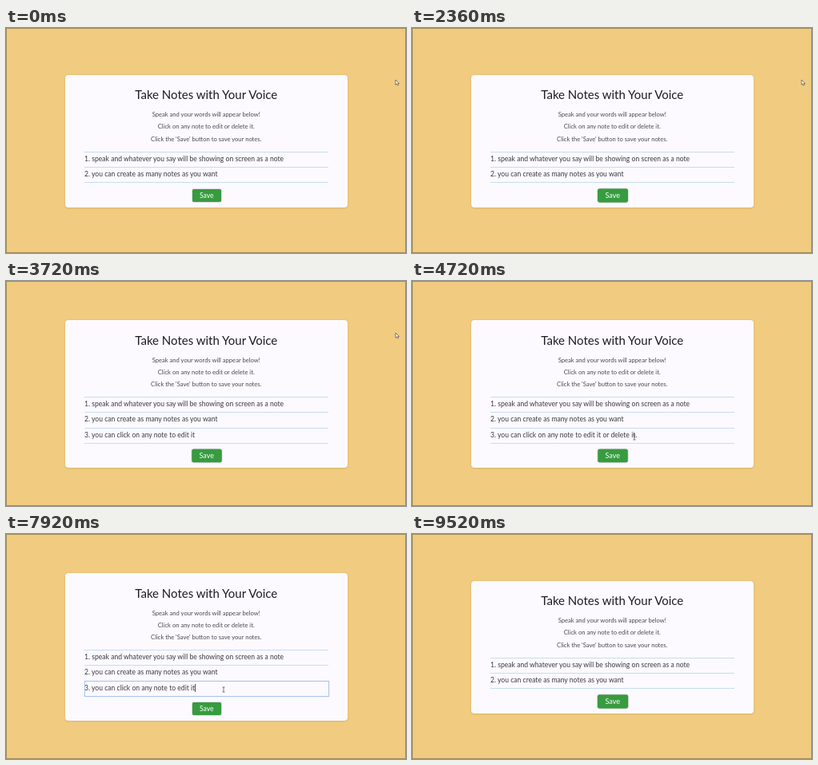
Write an HTML page that moves like this. It is 500 px wide and 282 px high and loops after 9.56 s.

```html
<!DOCTYPE html>
<html lang="en">
<head>
<meta charset="utf-8">
<title>Voice notes</title>
<style>
  html, body { margin: 0; width: 100%; height: 100%; overflow: hidden; }
  body { background: #f0cb80; font-family: Lato, sans-serif; color: #3a383e; }
  .stage { position: relative; width: 500px; height: 282px; overflow: hidden; }
  .edge { position: absolute; inset: 0; border: 1px solid #a38d5d; }

  .card {
    position: absolute; left: 74px; top: 58.5px; width: 352.5px; height: 166px;
    border-radius: 4px; background: #fcfafe;
    box-shadow: 0 .5px 2px rgba(90, 65, 15, .25);
    animation: grow 9.56s step-end infinite;
  }
  h1, p { margin: 0; text-align: center; white-space: nowrap; }
  h1 { padding-top: 14.5px; font-size: 15px; font-weight: 400; line-height: 20px; color: #1d1b21; }
  .hints { position: absolute; top: 42.5px; width: 100%; }
  p { font-size: 7.6px; line-height: 15.4px; color: #4a484e; }

  .notes { position: absolute; left: 24px; top: 96px; width: 305px; border-top: 1px solid #c6dcf3; }
  .note {
    position: relative; box-sizing: border-box; height: 19.3px; border-bottom: 1px solid #c6dcf3;
    font-size: 8.55px; line-height: 17px; word-spacing: .1px; white-space: pre;
  }
  .spoken { animation: present 9.56s step-end infinite; }
  .ring {
    position: absolute; inset: -1px -.5px -1px -.5px; border: 1px solid #a9c5ee;
    box-shadow: 0 0 1px #c3d8f6; opacity: 0;
    animation: focus 9.56s step-end infinite;
  }
  #marked { background: #b4d5fe; }
  #caret { display: inline-block; width: 1px; height: 10px; margin-right: -1px; vertical-align: -2px; background: #555; }

  .save {
    position: absolute; left: 158.5px; bottom: 7px; width: 35.5px; height: 16px;
    border-radius: 2px; background: #379b3f; color: #fff;
    font-size: 8.6px; line-height: 17px; text-align: center;
    box-shadow: 0 0 1.5px rgba(40, 50, 40, .6);
    animation: pulse 1s ease-in-out infinite;
  }

  .pointer { position: absolute; left: 0; top: 0; width: 1px; height: 1px; overflow: visible; animation: travel 9.56s ease-in-out infinite; }
  .arrow { animation: arrow 9.56s step-end infinite; }
  .beam { animation: beam 9.56s step-end infinite; }

  @keyframes grow {
    0%, 95% { top: 58.5px; height: 166px; }
    31%, 94.99% { top: 49px; height: 185px; }
    100% { top: 58.5px; height: 166px; }
  }
  @keyframes present {
    0%, 95%, 100% { visibility: hidden; }
    31% { visibility: visible; }
  }
  @keyframes focus {
    0%, 75.3%, 92%, 100% { opacity: 0; }
    50%, 79.7% { opacity: 1; }
  }
  @keyframes pulse {
    0%, 100% { transform: none; }
    50% { transform: scale(1.06); }
  }
  @keyframes travel {
    0%, 41.4% { transform: translate(487px, 65px); }
    48.5%, 52.3% { transform: translate(278px, 196px); }
    59.6%, 71.1% { transform: translate(243px, 192px); }
    74.7%, 76.4% { transform: translate(262px, 252px); }
    79.5%, 83.5% { transform: translate(272px, 195px); }
    88.5%, 91% { transform: translate(4px, 193px); }
    97.9%, 100% { transform: translate(503px, 120px); }
  }
  @keyframes arrow {
    0%, 72%, 91%, 100% { opacity: 1; }
    48%, 79% { opacity: 0; }
  }
  @keyframes beam {
    0%, 72%, 91%, 100% { opacity: 0; }
    48%, 79% { opacity: 1; }
  }
</style>
</head>
<body>
<div class="stage">
  <div class="edge"></div>
  <div class="card">
    <h1>Take Notes with Your Voice</h1>
    <div class="hints">
      <p>Speak and your words will appear below!</p>
      <p>Click on any note to edit or delete it.</p>
      <p>Click the 'Save' button to save your notes.</p>
    </div>
    <div class="notes">
      <div class="note">1. speak and whatever you say will be showing on screen as a note</div>
      <div class="note">2. you can create as many notes as you want</div>
      <div class="note spoken"><span id="plain"></span><span id="marked"></span><span id="caret"></span><div class="ring"></div></div>
    </div>
    <div class="save">Save</div>
  </div>
  <svg class="pointer">
    <path class="arrow" d="M0 0V6.2L1.5 4.9L2.5 7L3.5 6.5L2.6 4.5H4.4Z" fill="#fff" stroke="#333" stroke-width=".6"/>
    <path class="beam" d="M-1.5 -3H1.5M0 -3V3M-1.5 3H1.5" fill="none" stroke="#444" stroke-width=".7"/>
  </svg>
</div>
<script>
  const LOOP = 9560;
  const KEPT = '3. you can click on any note to edit it';
  const FULL = KEPT + ' or delete it.';
  const WORDS = FULL.split(' ');
  const [plain, marked, caret] = ['plain', 'marked', 'caret'].map(id => document.getElementById(id));
  const animations = document.getAnimations();
  animations.forEach(a => a.pause());

  const progress = (t, from, to) => Math.min(1, Math.max(0, (t - from) / (to - from)));
  const ease = p => p * p * (3 - 2 * p);
  const mix = (a, b, p) => Math.round(a + (b - a) * p);

  function noteText(t) {
    if (t < 5000) return WORDS.slice(0, Math.floor(progress(t, 3100, 3840) * WORDS.length)).join(' ');
    return t < 5960 ? FULL : t < 8720 ? KEPT : '';
  }

  function selectionStart(t, length) {
    if (t >= 5000 && t < 5960) return mix(FULL.length, KEPT.length, ease(progress(t, 5000, 5700)));
    if (t >= 7980 && t < 8720) return mix(KEPT.length, 0, ease(progress(t, 7980, 8460)));
    return length;
  }

  function caretShown(t) {
    const since = [8720, 7620, 5960, 4780].find(start => t >= start);
    const focused = t >= 4780 && t < 7200 || t >= 7620 && t < 8795;
    return focused && (t - since) % 1060 < 530;
  }

  function render() {
    const t = performance.now() % LOOP;
    animations.forEach(a => { a.currentTime = t; });
    const text = noteText(t);
    const start = selectionStart(t, text.length);
    plain.textContent = text.slice(0, start);
    marked.textContent = text.slice(start);
    caret.style.opacity = start === text.length && caretShown(t) ? 1 : 0;
    requestAnimationFrame(render);
  }
  render();
</script>
</body>
</html>
```
